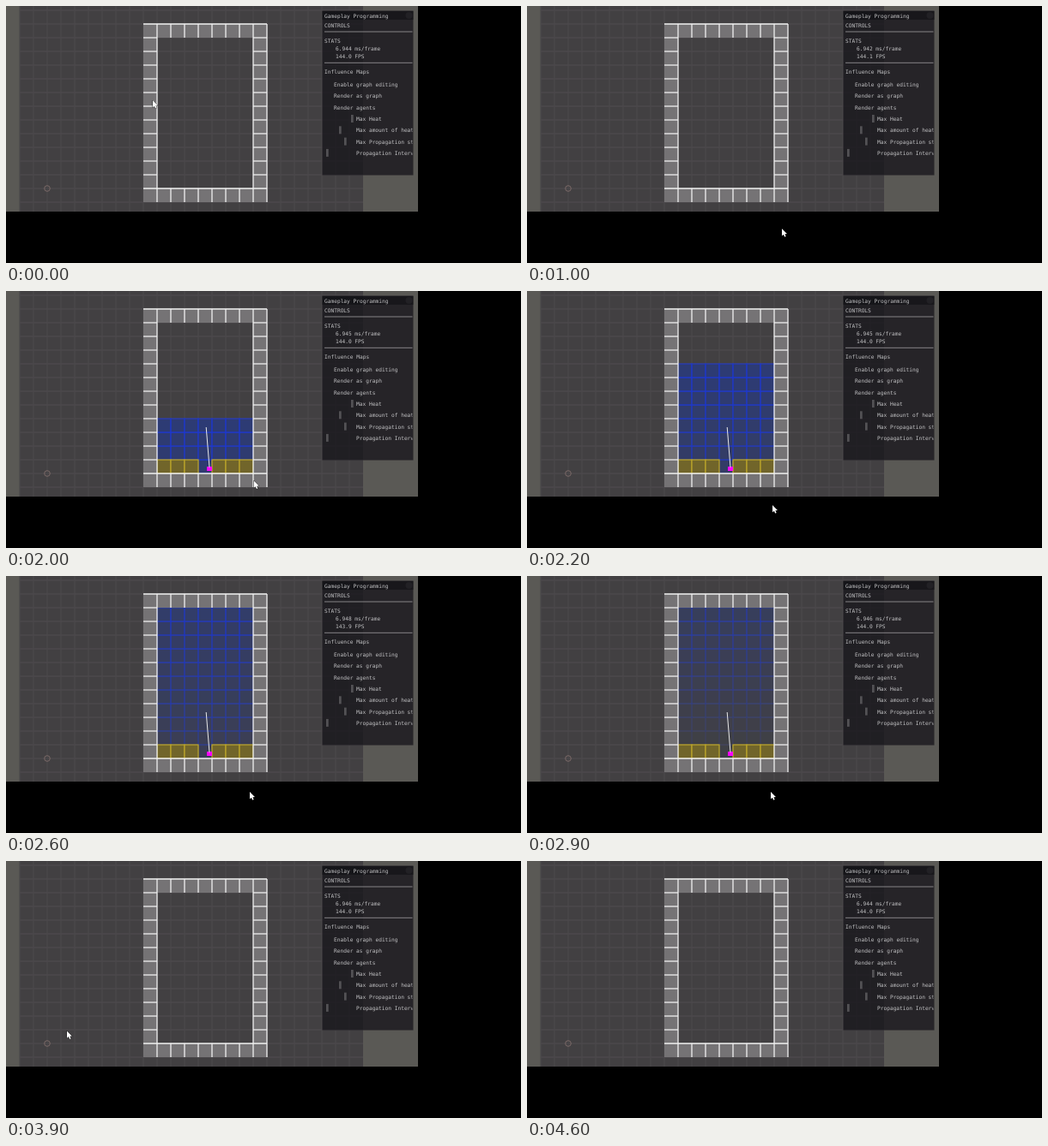
Write an HTML page with a canvas that moves like this. It is 600x300 px and loops after 4700 ms.

```html
<!DOCTYPE html>
<html lang="en">
<head>
<meta charset="utf-8">
<title>Influence Maps</title>
<style>
html, body { margin: 0; width: 600px; height: 300px; overflow: hidden; background: #000; }
canvas { display: block; }
</style>
</head>
<body>
<canvas id="stage" width="600" height="300"></canvas>
<script>
const ctx = document.getElementById('stage').getContext('2d');
const LOOP = 4700, STEP = 100, CELL = 16;
const LEFT = 160, TOP = 21, COLS = 9, ROWS = 13;
const PLACED = 1500, SPREAD = 1900, CLEARED = 3100, HIDDEN = 4000, COOLING = 1100;

// [time, x, y]
const pointer = [
  [0, 171, 110], [600, 270, 257], [1000, 297, 260], [1200, 297, 260],
  [1500, 237, 207], [1800, 291.5, 193], [2200, 286, 250], [2600, 284, 252],
  [2900, 284, 252], [3300, 105, 162], [3500, 87, 172], [4000, 67, 205]
];
// [time, microseconds per frame]
const timing = [
  [0, 6944], [500, 6946], [1000, 6942], [1800, 6945], [2200, 6945],
  [2600, 6948], [3300, 6944], [3900, 6946], [4600, 6944]
];

function at(keys, t) {
  const i = keys.findIndex(k => k[0] > t);
  if (i < 0) return keys[keys.length - 1].slice(1);
  const a = keys[i - 1], b = keys[i], p = (t - a[0]) / (b[0] - a[0]);
  return a.slice(1).map((v, j) => v + (b[j + 1] - v) * p);
}

function rect(x, y, w, h, color) {
  ctx.fillStyle = color;
  ctx.fillRect(x, y, w, h);
}

function line(x1, y1, x2, y2, color, width = 1.3) {
  ctx.strokeStyle = color;
  ctx.lineWidth = width;
  ctx.beginPath();
  ctx.moveTo(x1, y1);
  ctx.lineTo(x2, y2);
  ctx.stroke();
}

function text(s, x, y) {
  ctx.fillStyle = '#c2c2c4';
  ctx.fillText(s, x, y);
}

function cell(x, y, fill, edge) {
  rect(x, y, CELL, CELL, fill);
  ctx.strokeStyle = edge;
  ctx.lineWidth = 1.3;
  ctx.strokeRect(x, y, CELL, CELL);
}

function drawGround() {
  rect(0, 0, 600, 300, '#000');
  rect(0, 0, 480, 240, '#5a5955');
  rect(16, 0, 400, 240, '#424042');
  for (let x = 16; x < 416; x += CELL) line(x, 0, x, 240, '#4b494b');
  for (let y = 5; y < 240; y += CELL) line(16, y, 416, y, '#4b494b');
  ctx.strokeStyle = '#7a6967';
  ctx.lineWidth = 1;
  ctx.beginPath();
  ctx.arc(48, 213, 3.3, 0, Math.PI * 2);
  ctx.stroke();
}

function drawWalls() {
  const w = COLS * CELL, h = ROWS * CELL, fill = '#757375', edge = '#f0f0f0';
  const right = LEFT + w - CELL, bottom = TOP + h - CELL;
  rect(LEFT, TOP, w, CELL, fill);
  rect(LEFT, bottom, w, CELL, fill);
  rect(LEFT, TOP, CELL, h, fill);
  rect(right, TOP, CELL, h, fill);
  for (let y = TOP + CELL; y < bottom; y += CELL) {
    line(LEFT, y, LEFT + CELL, y, edge);
    line(right, y, right + CELL, y, edge);
  }
  for (let x = LEFT + 2 * CELL; x < right; x += CELL) {
    line(x, TOP, x, TOP + CELL, edge);
    line(x, bottom, x, bottom + CELL, edge);
  }
  for (const y of [TOP, bottom]) line(LEFT, y, LEFT + w, y, edge);
  for (const x of [LEFT + CELL, right, LEFT + w]) line(x, TOP, x, TOP + h, edge);
}

function drawHeat(t) {
  const x0 = LEFT + CELL, base = 197;
  // each row cools from the moment the wave reaches it
  for (let r = -1; r < 10; r++) {
    const age = t - SPREAD - Math.max(r, 0) * STEP / 2;
    const heat = .6 * (1 - age / COOLING);
    if (age < 0 || heat <= 0) continue;
    const fill = `rgba(32,56,150,${heat})`, edge = `rgba(28,56,220,${heat * 1.1})`;
    for (let c = 0; c < 7; c++) {
      if (r >= 0 || c === 3) cell(x0 + c * CELL, base - (r + 1) * CELL, fill, edge);
    }
  }
  if (t < SPREAD || t >= CLEARED) return;
  for (const c of [0, 1, 2, 4, 5, 6]) cell(x0 + c * CELL, base, '#71652a', '#b9a32a');
}

function drawAgent(t) {
  if (t < PLACED || t >= CLEARED) return;
  rect(234, 205, 6, 5, '#f0f');
  if (t >= SPREAD) line(237, 206, 233.2, 159, '#e8e8e8', 1);
}

function drawPanel(t) {
  const ms = Math.round(at(timing, t)[0]) / 1000;
  rect(368.5, 5.5, 106, 192, 'rgba(24,22,27,.78)');
  rect(368.5, 6, 106, 10, 'rgba(14,13,17,.55)');
  ctx.fillStyle = '#222125';
  ctx.beginPath();
  ctx.arc(469.5, 11, 4, 0, Math.PI * 2);
  ctx.fill();
  for (const y of [30, 66.3]) line(371, y, 473.5, y, '#858386', 1);

  ctx.save();
  ctx.beginPath();
  ctx.rect(368, 5, 105.5, 192);
  ctx.clip();
  ctx.font = '6.2px "DejaVu Sans Mono", monospace';
  text('Gameplay Programming', 371, 13.5);
  text('CONTROLS', 371, 25);
  text('STATS', 371, 43);
  text(ms.toFixed(3) + ' ms/frame', 384, 52);
  text((1000 / ms).toFixed(1) + ' FPS', 384, 61);
  text('Influence Maps', 371, 78.5);
  ['Enable graph editing', 'Render as graph', 'Render agents']
    .forEach((s, i) => text(s, 382, 94 + i * 13.3));
  [['Max Heat', 402], ['Max amount of heat', 388],
   ['Max Propagation steps', 394], ['Propagation Interval', 373]]
    .forEach(([s, x], i) => {
      const y = 134 + i * 13.3;
      text(s, 408, y);
      rect(x, y - 7, 2.7, 9, '#535255');
    });
  ctx.restore();
}

function drawPointer(t) {
  if (t >= HIDDEN) return;
  const [x, y] = at(pointer, t);
  ctx.save();
  ctx.translate(x, y);
  ctx.beginPath();
  [[0, 0], [0, 8.3], [1.9, 6.7], [3.2, 9.6], [4.6, 9], [3.4, 6.2], [5.9, 6]]
    .forEach(p => ctx.lineTo(...p));
  ctx.closePath();
  ctx.lineWidth = .8;
  ctx.strokeStyle = '#111';
  ctx.stroke();
  ctx.fillStyle = '#fff';
  ctx.fill();
  ctx.restore();
}

const start = performance.now();
function draw() {
  const t = Math.floor((performance.now() - start) % LOOP / STEP) * STEP;
  drawGround();
  drawHeat(t);
  drawWalls();
  drawAgent(t);
  drawPanel(t);
  drawPointer(t);
  requestAnimationFrame(draw);
}
draw();
</script>
</body>
</html>
```
